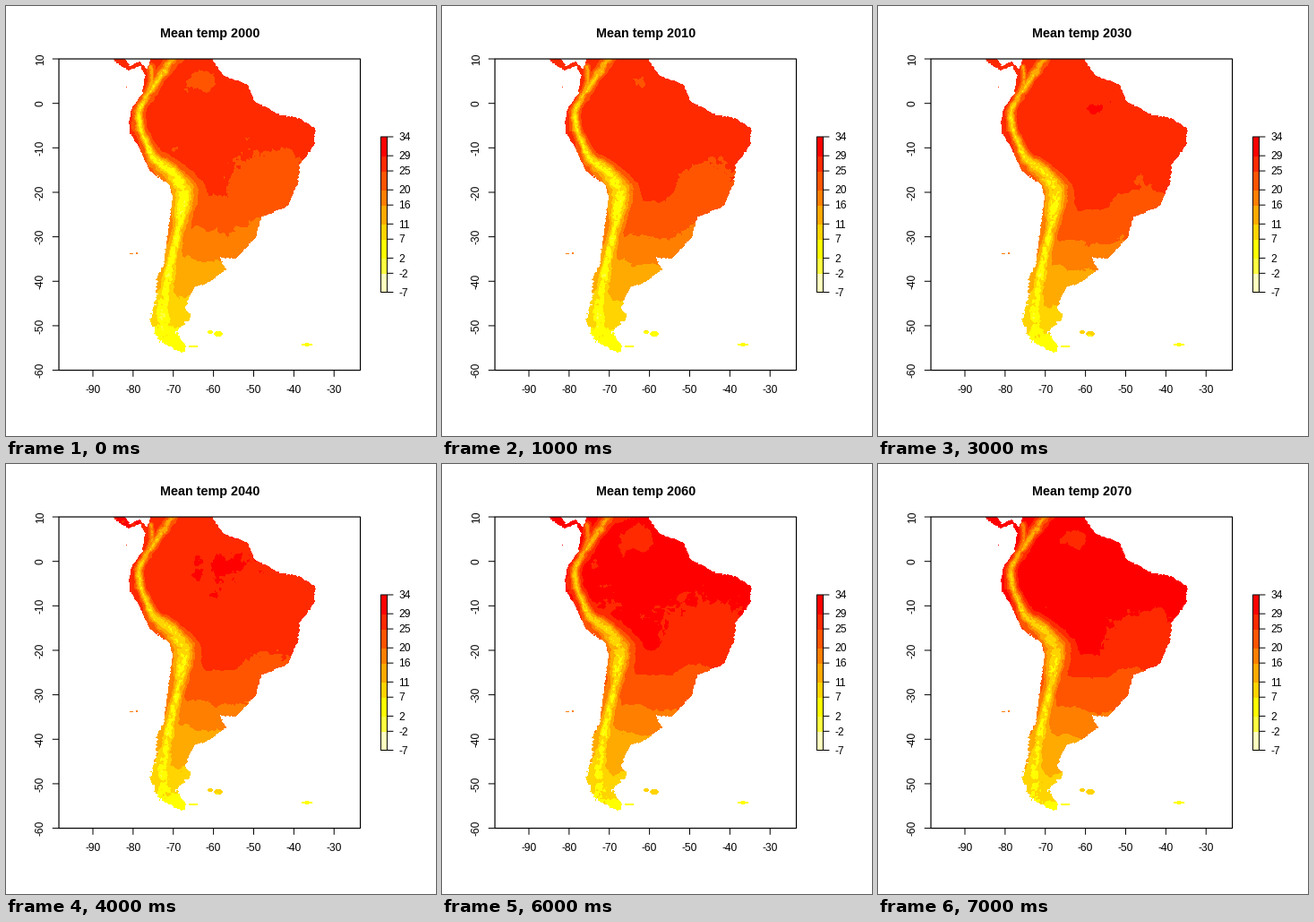
These frames come from a looping animation (480 px wide and 480 px high, 8 s). A matplotlib script:

```python
import numpy as np
import matplotlib.pyplot as plt
from matplotlib.animation import FuncAnimation
from matplotlib.path import Path
from matplotlib.patches import Rectangle

SIZE = 480
STEPS = 8
X0, X1, Y0, Y1 = 59, 396, 59, 407
PX = 0.72  # one pixel in points at 100 dpi
plt.rcParams["path.snap"] = False

BREAKS = np.round(np.linspace(-7, 34, 10)).astype(int)
HEAT = np.array([(255, 255, 191), (255, 255, 64)]
                + [(255, int(42.5 * k), 0) for k in range(6, -1, -1)], np.uint8)

# key points of the coast, then islands as x, y, half width, half height
COAST = [(116, 55), (122, 62), (136, 72), (150, 67), (155, 76), (152, 98),
         (141, 113), (137, 128), (138, 142), (147, 155), (161, 185),
         (183, 200), (186, 215), (179, 265), (176, 290), (169, 303),
         (168, 325), (161, 350), (170, 374), (197, 387), (201, 380),
         (190, 364), (207, 346), (199, 336), (211, 313), (224, 310),
         (246, 294), (238, 281), (257, 282), (279, 258), (285, 236),
         (315, 223), (326, 198), (328, 177), (344, 155), (345, 137),
         (327, 125), (306, 121), (277, 106), (270, 88), (243, 78),
         (227, 55), (164, 55), (157, 70), (149, 62), (138, 67), (130, 55)]
ISLES = [(228, 364, 3, 2), (237, 366, 5, 3), (209, 380, 6, 1.2),
         (336, 378, 6, 1.6), (134.5, 90.5, 0.6, 0.6), (146, 276, 1.6, 0.8),
         (140, 276.5, 2, 0.6)]
ANDES = [(188, 56), (158, 100), (148, 118), (150, 138), (164, 170),
         (185, 185), (198, 205), (194, 242), (183, 290), (174, 335), (177, 388)]
BRANCH = [(162, 68), (163, 84), (157, 100)]

# warm and cool regions: x, y, spread x, spread y, degrees
REGIONS = [(300, 195, 30, 28, -1.9), (281, 240, 14, 12, -1.6),
           (218, 86, 13, 9, -1.5), (237, 203, 18, 20, 1.4),
           (240, 115, 22, 16, 0.7), (188, 122, 15, 36, -0.6)]

X, Y = np.meshgrid(np.arange(X0, X1) + 0.5, np.arange(Y0, Y1) + 0.5)
rng = np.random.default_rng(12)


def noise(cell):
    """Smooth random field with square cells."""
    h, w = X.shape
    grid = rng.normal(size=(int(h / cell) + 3, int(w / cell) + 3))
    u, v = np.arange(w) / cell, np.arange(h) / cell
    i, j = u.astype(int), v.astype(int)
    fu, fv = u - i, (v - j)[:, None]
    rows = grid[j] * (1 - fv) + grid[j + 1] * fv
    return rows[:, i] * (1 - fu) + rows[:, i + 1] * fu


def bell(v, mid, spread):
    return np.exp(-((v - mid) / spread) ** 2)


def rising(v, mid, spread):
    return 1 / (1 + np.exp((mid - v) / spread))


def distance(line):
    """Distance of every cell to a polyline."""
    best = np.full(X.shape, 1e3)
    for (ax_, ay_), (bx, by) in zip(line, line[1:]):
        dx, dy = bx - ax_, by - ay_
        t = ((X - ax_) * dx + (Y - ay_) * dy) / (dx * dx + dy * dy)
        t = np.clip(t, 0, 1)
        best = np.minimum(best, np.hypot(X - ax_ - t * dx, Y - ay_ - t * dy))
    return best


def land_mask():
    rough = 0.5 + 0.6 * ((Y > 292) & (X < 205))
    pts = np.dstack([X + rough * noise(2), Y + rough * noise(2)]).reshape(-1, 2)
    land = Path(COAST + COAST[:1]).contains_points(pts).reshape(X.shape)
    for x, y, rx, ry in ISLES:
        land |= ((X - x) / rx) ** 2 + ((Y - y) / ry) ** 2 < 1
    return land


def temperature():
    t = 26 - 2.5 * np.log1p(np.exp((Y - 205) / 20))
    for x, y, sx, sy, amp in REGIONS:
        t += amp * bell(X, x, 1.4 * sx) * bell(Y, y, 1.4 * sy)
    t += 0.28 * noise(28) + 0.28 * noise(11) + 0.16 * noise(4) + 0.08 * noise(2)

    # mountains pull the field towards an alpine temperature
    west = X < np.interp(Y, *np.array(ANDES).T[::-1])
    d = distance(ANDES) * np.where(west & (Y > 140), 1.35, 1) + 0.8 * noise(5)
    width = 4.3 + 9.5 * bell(Y, 207, 32) + 2.5 * rising(Y, 270, 15)
    ridge = np.maximum(np.exp(-(d / width) ** 2),
                       0.7 * bell(distance(BRANCH), 0, 3))
    alpine = 3.5 + 7 * np.exp((Y0 - Y) / 60) + 1.6 * noise(5) + 1.6 * noise(2)
    t -= 4 * bell(Y, 215, 60) * (west & (X > 149))
    return t + (alpine - t) * ridge


land = land_mask()
base = temperature()
rise = 1 - 0.4 * rising(Y, 243, 10)


def picture(k):
    warming = 4.2 * (k / (STEPS - 1)) ** 0.85
    level = np.digitize(base + warming * rise, BREAKS[1:-1])
    return np.where(land[..., None], HEAT[level], np.uint8(255))


fig = plt.figure(figsize=(4.8, 4.8), dpi=100, facecolor="white")
ax = fig.add_axes([0, 0, 1, 1])
img = ax.imshow(picture(0), extent=(X0, X1, Y1, Y0), interpolation="nearest")
ax.set(xlim=(0, SIZE), ylim=(SIZE, 0), aspect="auto")
ax.axis("off")


def line(xs, ys):
    ax.plot(xs, ys, color="black", lw=PX, solid_capstyle="butt")


def label(x, y, s, size=12, **kw):
    kw = {"ha": "center", "va": "baseline", **kw}
    return ax.text(x, y, s, family="Liberation Sans", size=size * PX, **kw)


def frame(x, y, w, h, lw=1):
    ax.add_patch(Rectangle((x, y), w, h, fill=False, ec="black",
                           lw=lw * PX, zorder=3))


frame(59.04, 59.04, 336.5, 347.52, 1.2)
for k in range(7):
    x = 97 + 44.87 * k
    line([x, x], [406.56, 413.8])
    label(x, 432, str(10 * k - 90))
for k in range(8):
    y = 59.04 + 49.646 * k
    line([51.8, 59.04], [y, y])
    label(42, y, str(10 - 10 * k), rotation=90, rotation_mode="anchor")


def bar_y(v):
    return 146 + (34 - v) * 173.5 / 41


for lo, hi, color in zip(BREAKS, BREAKS[1:], HEAT / 255):
    ax.add_patch(Rectangle((418.4, bar_y(hi)), 7, bar_y(lo) - bar_y(hi),
                           fc=color, ec="none", lw=0, antialiased=False))
frame(418.4, 146, 7, 173.5)
for v in BREAKS:
    line([425.4, 432.4], [bar_y(v)] * 2)
    label(438.3, bar_y(v) + 4.2, str(v), ha="left")

title = label(227.3, 35, "", 14.4, weight="bold")


def update(k):
    img.set_data(picture(k))
    title.set_text(f"Mean temp {2000 + 10 * k}")
    return img, title


anim = FuncAnimation(fig, update, frames=STEPS, interval=1000, repeat=True,
                     repeat_delay=0, init_func=lambda: update(0))
plt.show()
```
